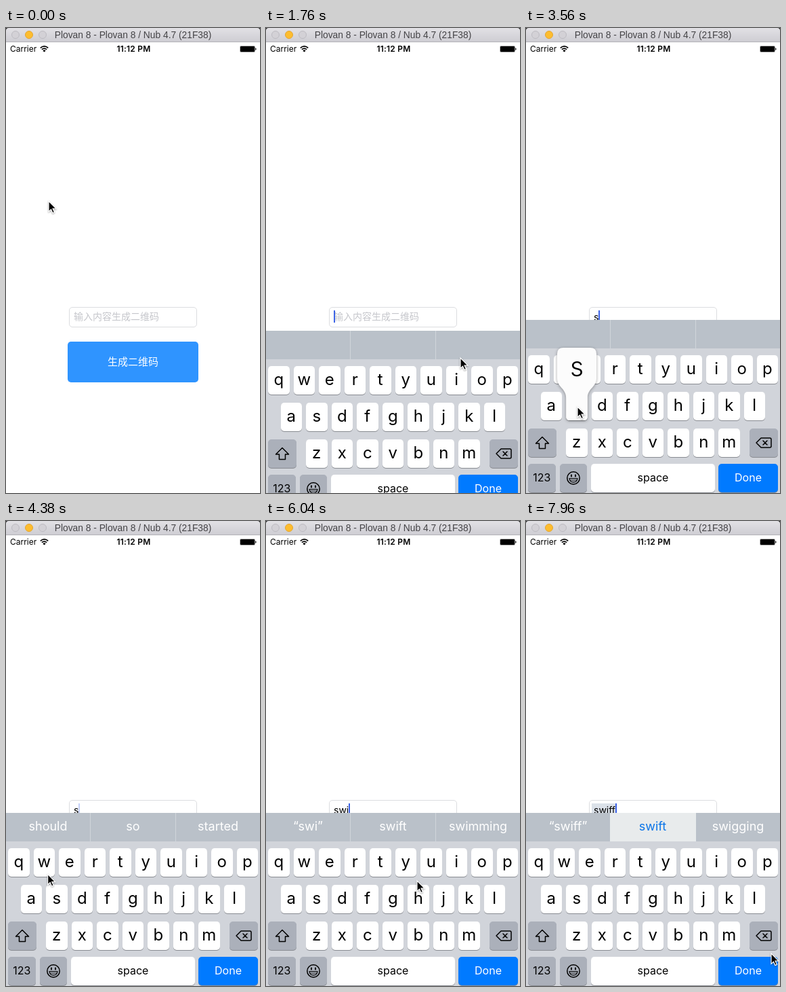
These frames come from a looping animation (375 px wide and 685 px high, 8 s). An HTML page:

```html
<!DOCTYPE html>
<html lang="zh-CN">
<head>
<meta charset="utf-8">
<title>Keyboard demo</title>
<style>
html, body { margin: 0; width: 100%; height: 100%; overflow: hidden; background: #fff; }
#stage { position: relative; width: 375px; height: 685px; overflow: hidden; background: #fff; font-family: Inter, Roboto, sans-serif; color: #000; }
#stage div, #stage > svg { position: absolute; box-sizing: border-box; white-space: pre; }
.cjk { font-family: "Noto Sans CJK SC", "Noto Sans CJK JP", "Noto Sans CJK", sans-serif; }

#corners { left: 0; top: 0; width: 375px; height: 6px; background: #222; }
#bar { left: 0; top: 0; width: 375px; height: 21px; border-radius: 4px 4px 0 0; border-bottom: 1px solid #b4b3b8; background: linear-gradient(#e2e1e5, #cecdd3); font: 13.8px/21px "Liberation Sans", Arial, sans-serif; color: #454447; text-align: center; }
.dot { top: 4px; width: 12px; height: 12px; border-radius: 50%; border: 1px solid #bdbbc1; background: #d3d1d6; }
.dot.on { border-color: #e5a530; background: #fdbd2f; }
#carrier { left: 6px; top: 23px; font-size: 12px; line-height: 16px; }
#clock { left: 0; top: 23px; width: 377px; text-align: center; font-size: 12px; line-height: 16px; font-weight: 600; letter-spacing: .2px; }

#field { left: 93px; top: 411px; width: 189px; height: 30px; border: 1px solid #dcdde0; border-radius: 5px; background: #fff; }
#hint { left: 6px; top: 2px; font-size: 14px; line-height: 21px; color: #c5c6cb; }
#typed { left: 3px; top: 4px; height: 19px; padding: 0 1px 0 3px; font-size: 14px; line-height: 20px; }
#typed.marked { background: #dbe1e9; }
#caret { position: absolute; left: 100%; margin-left: -1px; top: 0; width: 2px; height: 18px; background: #3c63e6; }
#button { left: 91px; top: 462px; width: 193px; height: 60px; border-radius: 5px; background: #2f94ff; color: #fff; text-align: center; font-size: 15px; line-height: 58px; }

#kb { left: 0; top: 430px; width: 375px; height: 258px; background: #d1d4da; }
.sug { top: 0; height: 42px; background: #bac1c9; color: #fff; font-size: 18px; line-height: 39px; text-align: center; }
.sug.hot { z-index: 1; padding-right: 1px; background: #e8ebec; color: #0d76e8; }
.rule { top: 0; width: 1px; height: 42px; background: #d0d5da; }
.key { height: 42px; border-radius: 5px; background: #fff; box-shadow: 0 1px 0 #898c92; text-align: center; font-size: 24px; line-height: 39px; }
.key.small { font-size: 16px; line-height: 41px; }
.key.grey { background: #abb0ba; }
.key.blue { background: #007aff; color: #fff; }
.key svg { position: absolute; left: 50%; top: 50%; margin: -13px 0 0 -13px; fill: none; stroke: #000; stroke-width: 1.5; stroke-linejoin: round; stroke-linecap: round; }
#pop { position: absolute; z-index: 2; overflow: visible; filter: drop-shadow(0 1px 2px rgba(0,0,0,.35)); }
#pop text { font-size: 39px; font-weight: 300; text-anchor: middle; }
#arrow { left: 0; top: 0; overflow: visible; filter: drop-shadow(0 1px 1px rgba(0,0,0,.35)); }
</style>
</head>
<body>
<div id="stage">
  <div id="corners"></div>
  <div id="bar">Plovan 8 - Plovan 8 / Nub 4.7 (21F38)</div>
  <div class="dot" style="left:8px"></div>
  <div class="dot on" style="left:28px"></div>
  <div class="dot" style="left:48px"></div>
  <div id="carrier">Carrier</div>
  <svg style="left:50px;top:25px" width="13" height="12" fill="none" stroke="#000" stroke-width="1.7">
    <path d="M.8 4.4Q6.5-.8 12.2 4.4M2.9 6.7Q6.5 3.4 10.1 6.7"/>
    <path d="M4.3 8.2Q6.5 6.3 8.7 8.2L6.5 10.6Z" fill="#000" stroke="none"/>
  </svg>
  <div id="clock">11:12 PM</div>
  <svg style="left:345px;top:26px" width="26" height="11">
    <rect x=".5" y=".5" width="22" height="9" rx="1.5" fill="#fff" stroke="#777" stroke-width=".6"/>
    <rect x="1" y="1" width="21" height="8" rx="1"/>
    <path d="M23.5 3.5q1.6 1.5 0 3Z" stroke="#000" stroke-width=".6"/>
  </svg>

  <div id="field">
    <div id="hint" class="cjk">输入内容生成二维码</div>
    <div id="typed"><span id="word"></span><i id="caret"></i></div>
  </div>
  <div id="button" class="cjk">生成二维码</div>

  <div id="kb">
    <div class="sug" style="left:0;width:124px"></div>
    <div class="sug" style="left:124px;width:127px"></div>
    <div class="sug" style="left:251px;width:124px"></div>
    <div class="rule" style="left:124px"></div>
    <div class="rule" style="left:250px"></div>
    <svg id="pop" width="1" height="1">
      <path fill="#fcfcfc" d="M-29-56q0-9 9-9h40q9 0 9 9v36c0 13-13.25 15-13.25 29V37q0 5-5 5h-21.5q-5 0-5-5V9c0-14-13.25-16-13.25-29Z"/>
      <text y="-23"></text>
    </svg>
  </div>

  <svg id="arrow" width="12" height="19">
    <path d="M0 0V15.4L3.5 12.2 5.9 17.6 8.5 16.5 6.1 11.2H11Z" stroke="#fff" stroke-width="1.2"/>
  </svg>
</div>

<script>
const LOOP = 8000;
const $ = id => document.getElementById(id);
const kb = $('kb'), pop = $('pop'), popText = pop.querySelector('text');
const sugs = [...document.querySelectorAll('.sug')];
const keyAt = {};

function addKey(x, y, w, label, kind = '') {
  const k = document.createElement('div');
  k.className = 'key ' + kind;
  k.style.cssText = `left:${x}px;top:${y}px;width:${w}px`;
  k.innerHTML = label;
  kb.insertBefore(k, pop);
  keyAt[label] = [x + w / 2, y];
}
const icon = body => `<svg width="26" height="26">${body}</svg>`;

[['qwertyuiop', 3, 52], ['asdfghjkl', 21.5, 106], ['zxcvbnm', 59, 160]].forEach(([row, x, y]) =>
  [...row].forEach((c, i) => addKey(x + i * 37.5, y, 31.5, c)));
addKey(3, 160, 42, icon('<path d="M13 4.5L22.5 14H17.5V21.5H8.5V14H3.5Z"/>'), 'grey');
addKey(330, 160, 42, icon('<path d="M9 6H22Q24 6 24 8V18Q24 20 22 20H9L2 13ZM12 10l6 6m0-6l-6 6"/>'), 'grey');
addKey(3, 212, 40.5, '123', 'small grey');
addKey(49.5, 212, 40.5, icon('<circle cx="13" cy="13" r="9.2"/><path d="M10 8.5v2M16 8.5v2" stroke-width="2"/><path d="M7 13.5H19Q18.2 19.2 13 19.2T7 13.5Z" stroke-width="1.2"/><path d="M8 16H18" stroke-width=".8"/>'), 'grey');
addKey(96, 212, 183, 'space', 'small');
addKey(284, 212, 88, 'Done', 'small blue');

// Pointer path: time, x, y
const path = [
  [60, 63, 255], [760, 201, 408], [1000, 201, 408], [1120, 202.5, 419], [1480, 202.5, 419],
  [1760, 287, 486], [2280, 319, 505], [2380, 319, 505], [3120, 64, 551], [3220, 64, 551],
  [3400, 76, 558], [4060, 76, 558], [4460, 60, 516], [4860, 60, 515], [5060, 308, 514],
  [5280, 290, 508], [5800, 290, 508], [6280, 156, 552], [6520, 156, 555], [7320, 156, 555],
  [7540, 337, 643], [7700, 337, 643], [7960, 362, 637]
];
// Key presses: popup start, popup end, time of insertion, letter
const presses = [
  [3440, 3640, 3500, 's'], [4520, 4700, 4590, 'w'], [5560, 5760, 5640, 'i'],
  [6520, 6660, 6560, 'f'], [6780, 6880, 6840, 'f']
];
// Suggestions: time, three words, middle one preselected
const hints = [
  [0, ['', '', ''], 0],
  [3700, ['should', 'so', 'started'], 0],
  [4800, ['“sw”', 'swear', 'sweet'], 0],
  [5860, ['“swi”', 'swift', 'swimming'], 0],
  [6720, ['“swif”', 'swig', 'swift'], 1],
  [6980, ['“swiff”', 'swift', 'swigging'], 1]
];
const FOCUS = 1423;

function pointer(t) {
  const i = path.findIndex(p => p[0] > t);
  if (i < 0) return path[path.length - 1].slice(1);
  if (i === 0) return path[0].slice(1);
  const [a, b] = [path[i - 1], path[i]];
  const u = (t - a[0]) / (b[0] - a[0]), e = u * u * (3 - 2 * u);
  return [a[1] + (b[1] - a[1]) * e, a[2] + (b[2] - a[2]) * e];
}

// Critically damped rise from below the stage, on whole pixels
function keyboardDrop(t) {
  const x = Math.max(0, t - FOCUS) * 0.01335;
  return Math.round(258 * (1 + x) * Math.exp(-x));
}

function blink(age) {
  const p = age % 1000;
  return Math.max(0, Math.min(1, p < 700 ? (500 - p) / 100 : (p - 850) / 100));
}

function draw(t) {
  const [x, y] = pointer(t);
  $('arrow').style.transform = `translate(${x}px,${y}px)`;
  kb.style.transform = `translateY(${keyboardDrop(t)}px)`;

  const done = presses.filter(p => p[2] <= t);
  const last = done.length ? done[done.length - 1][2] : FOCUS;
  const hint = hints.filter(h => h[0] <= t).pop();
  $('word').textContent = done.map(p => p[3]).join('');
  $('hint').style.visibility = done.length ? 'hidden' : 'visible';
  $('caret').style.opacity = t < FOCUS ? 0 : blink(t - last);
  $('typed').className = hint[2] && hint[0] > last ? 'marked' : '';
  sugs.forEach((s, i) => {
    s.textContent = hint[1][i];
    s.classList.toggle('hot', i === 1 && !!hint[2]);
  });

  const down = presses.find(p => t >= p[0] && t < p[1]);
  pop.style.display = down ? 'block' : 'none';
  if (down) {
    const [kx, ky] = keyAt[down[3]];
    pop.style.left = kx + 'px';
    pop.style.top = ky + 'px';
    popText.textContent = down[3];
  }
}

let start;
function tick(now) {
  start ??= now;
  draw((now - start) % LOOP);
  requestAnimationFrame(tick);
}
draw(0);
requestAnimationFrame(tick);
</script>
</body>
</html>
```
